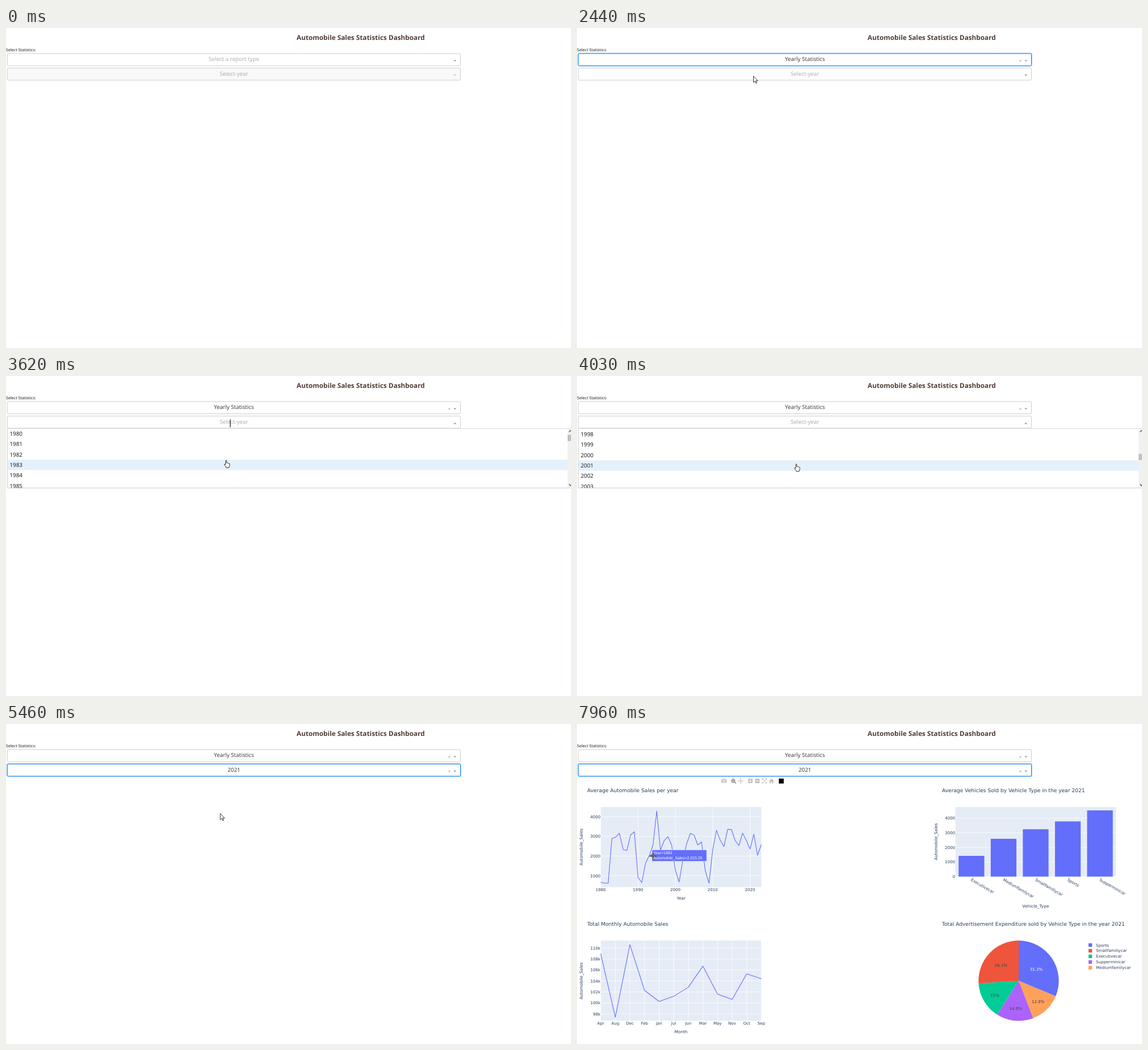
An HTML page that plays this animation: 994x563 px, repeating every 8 s.

```html
<!DOCTYPE html>
<html lang="en">
<head>
<meta charset="utf-8">
<title>Dashboard</title>
<style>
  html, body { margin: 0; width: 100%; height: 100%; overflow: hidden; background: #fff; }
  svg { display: block; width: 994px; height: 563px; }
  text { white-space: pre; text-rendering: geometricPrecision; }
  .ui { font: 9.85px "Open Sans", "Noto Sans", sans-serif; }
  .plot { font: 7.1px "DejaVu Sans", sans-serif; fill: #2a3f5f; }
  .tip { font: 6.9px "Liberation Sans", Arial, sans-serif; fill: #fff; }
</style>
</head>
<body>
<script>
const LOOP = 8000;
const BLUE = '#636efa', GRAY = '#ccc', FOCUS = '#007eff', HOVER = '#e4f1fc';

function add(parent, tag, attrs = {}, text) {
  const node = document.createElementNS('http://www.w3.org/2000/svg', tag);
  set(node, attrs);
  if (text !== undefined) node.textContent = text;
  parent.appendChild(node);
  return node;
}
function set(node, attrs) {
  for (const key in attrs) node.setAttribute(key, attrs[key]);
}
const show = (node, on) => set(node, { visibility: on ? 'visible' : 'hidden' });
const group = (parent, attrs) => add(parent, 'g', attrs);
const rect = (parent, x, y, width, height, fill, more) =>
  add(parent, 'rect', { x, y, width, height, fill, ...more });
const path = (parent, d, attrs) => add(parent, 'path', { d, ...attrs });
const label = (parent, x, y, text, more) => add(parent, 'text', { x, y, ...more }, text);
const MID = { 'text-anchor': 'middle' }, END = { 'text-anchor': 'end' };

const svg = add(document.body, 'svg', { viewBox: '0 0 994 563' });

// Header
const ui = group(svg, { class: 'ui' });
label(ui, 624, 21.3, 'Automobile Sales Statistics Dashboard',
  { ...MID, fill: '#503d36', style: 'font-size:11.77px;font-weight:700' });
label(ui, 0, 41.3, 'Select Statistics:', { fill: '#111', style: 'font-size:7.17px' });

// Select boxes
function makeSelect(y) {
  const g = group(ui);
  const glow = rect(g, 1.6, y - .4, 798.8, 22.8, 'none', { rx: 2.5, stroke: FOCUS, 'stroke-opacity': .3, 'stroke-width': 1.4 });
  const box = rect(g, 2.3, y + .4, 797.2, 21.4, '#fff', { rx: 2 });
  const text = label(g, 401, y + 13.6, '', MID);
  const clear = path(g, `M778.3 ${y + 11.5}l3.4 3.4m0 -3.4l-3.4 3.4`, { stroke: '#999', 'stroke-width': .8 });
  const arrow = path(g, '');
  const caret = rect(g, 394, y + 6.3, 1, 14, '#000');
  return state => {
    show(glow, state.focus);
    set(box, { stroke: state.focus ? FOCUS : GRAY, fill: state.disabled ? '#f9f9f9' : '#fff' });
    text.textContent = state.value || state.hint;
    set(text, { fill: state.value ? '#333' : '#aaa' });
    show(clear, !!state.value);
    set(arrow, {
      d: state.open ? `M787.2 ${y + 14.4}h5.2l-2.6 -2.6z` : `M787.2 ${y + 11.8}h5.2l-2.6 2.6z`,
      fill: state.disabled ? GRAY : '#999'
    });
    show(caret, state.caret);
  };
}
const drawReport = makeSelect(44.6);
const drawYear = makeSelect(70);

// Option menus
const ROW = 18.3, MENU_TOP = 92.4, SCROLL_MAX = 700.4;
function makeMenu(top, height, options) {
  const g = group(ui);
  const clipId = 'menu' + top;
  const clip = add(g, 'clipPath', { id: clipId });
  rect(clip, 2.5, top, 992, height);
  rect(g, 2.3, top, 1000, height, '#fff', { stroke: GRAY });
  const view = group(g, { 'clip-path': `url(#${clipId})` });
  const list = group(view);
  const mark = rect(list, 2.8, top, 992, ROW, HOVER);
  options.forEach((text, i) => label(list, 6.4, top + i * ROW + 12.7, text, { fill: '#111' }));
  path(g, `M2 ${top}H994`, { stroke: '#e2e2e2', 'stroke-width': .8 });
  return { g, list, mark };
}
const reportMenu = makeMenu(67, 2 * ROW, ['Yearly Statistics', 'Recession Period Statistics']);
const yearMenu = makeMenu(MENU_TOP, 104.6, Array.from({ length: 44 }, (_, i) => 1980 + i));
rect(yearMenu.g, 988, 93, 6, 103.5, '#f1f1f1');
const thumb = rect(yearMenu.g, 988, 103.5, 6, 11, '#c1c1c1');
path(yearMenu.g, 'M990.4 98.6l2.6 -2.8l2.6 2.8M990.4 190.2l2.6 2.8l2.6 -2.8',
  { fill: 'none', stroke: '#505050', 'stroke-width': 1.2 });

// Charts
const charts = group(svg, { class: 'plot' });
const heading = (x, y, text) => label(charts, x, y, text, { style: 'font-size:9.1px' });
const axisName = (x, y, text, turn) => label(charts, x, y, text,
  { ...MID, style: 'font-size:7.35px', ...(turn && { transform: `rotate(-90 ${x} ${y})` }) });

function panel(x, y, w, h, rows, cols) {
  rect(charts, x, y, w, h, '#e5ecf6');
  const d = rows.map(r => `M${x} ${r.at}h${w}`).join('') + cols.map(c => `M${c.at} ${y}v${h}`).join('');
  path(charts, d, { stroke: '#fff', 'stroke-width': .8 });
  rows.forEach(r => label(charts, x - .5, r.at + 2.6, r.text, END));
  cols.forEach(c => label(charts, c.at, y + h + 7.3, c.text, MID));
}
function polyline(points) {
  add(charts, 'polyline', { points: points.map(p => p.x + ',' + p.y).join(' '),
    fill: 'none', stroke: BLUE, 'stroke-width': 1.1, 'stroke-linejoin': 'round' });
}
const ticks = (from, to, step, at, text = String) => {
  const out = [];
  for (let v = from; v <= to; v += step) out.push({ at: at(v), text: text(v) });
  return out;
};

const yearX = year => 41.7 + (year - 1980) * 6.57;
const salesY = v => 267 - (v - 1000) * .03467;
const sales = [
  668, 625, 625, 2889, 2961, 3163, 2335, 2285, 3062, 3230, 913,
  654, 1635, 2023.25, 2543, 4288, 2298, 2788, 2990, 2557, 1270,
  683, 1808, 2615, 3149, 3062, 2557, 2715, 1260, 625, 2327,
  3307, 2805, 2485, 3355, 3350, 2788, 2529, 3163, 2788, 2356, 3106, 2038, 2586
].map((v, i) => ({ year: 1980 + i, value: v, x: yearX(1980 + i), y: salesY(v) }));

heading(18, 119.7, 'Average Automobile Sales per year');
panel(41.7, 146, 282.6, 141, ticks(1000, 4000, 1000, salesY), ticks(1980, 2020, 10, yearX));
polyline(sales);
axisName(183.3, 308.6, 'Year');
axisName(10.3, 216.5, 'Automobile_Sales', true);

const monthX = i => 41.7 + i * 25.69;
const monthY = k => 394 + (110 - k) * 9.67;
const months = 'Apr Aug Dec Feb Jan Jul Jun Mar May Nov Oct Sep'.split(' ');
heading(18, 355.2, 'Total Monthly Automobile Sales');
panel(41.7, 381, 282.6, 141, ticks(98, 110, 2, monthY, k => k + 'k'),
  months.map((text, i) => ({ at: monthX(i), text })));
polyline([108.96, 97.4, 110.6, 102.3, 100.25, 101.2, 102.85, 106.7, 101.6, 100.65, 105.3, 104.4]
  .map((k, i) => ({ x: monthX(i), y: monthY(k) })));
axisName(183, 544, 'Month');
axisName(10.3, 452, 'Automobile_Sales', true);

heading(642, 119.7, 'Average Vehicles Sold by Vehicle Type in the year 2021');
panel(665.7, 146, 282.6, 122.5, ticks(0, 4000, 1000, v => 268.5 - v * .0257), []);
[['Executivecar', 232], ['Mediumfamilycar', 202], ['Smallfamiliycar', 185.2], ['Sports', 171.4], ['Supperminicar', 152]]
  .forEach(([text, top], i) => {
    const x = 671.35 + i * 56.52;
    rect(charts, x, top, 45.2, 268.5 - top, BLUE);
    label(charts, x + 21, 275.6, text, { transform: `rotate(30 ${x + 21} 275.6)` });
  });
axisName(807, 322.6, 'Vehicle_Type');
axisName(634.3, 207, 'Automobile_Sales', true);

heading(642, 355.2, 'Total Advertisement Expenditure sold by Vehicle Type in the year 2021');
const slices = [
  ['Sports', 31.3, BLUE, 808, 431],
  ['Mediumfamilycar', 12.8, '#ffa15a', 811.3, 488],
  ['Supperminicar', 14.9, '#ab63fa', 771.6, 500.6],
  ['Executivecar', 15, '#00cc96', 735, 477.5],
  ['Smallfamiliycar', 26.1, '#ef553b', 746, 424]
];
const rim = share => {
  const a = share * Math.PI / 50;
  return `${777 + 70.6 * Math.sin(a)} ${451.7 - 70.6 * Math.cos(a)}`;
};
let share = 0;
slices.forEach(([, part, fill, x, y], i) => {
  path(charts, `M777 451.7L${rim(share)}A70.6 70.6 0 0 1 ${rim(share += part)}z`, { fill });
  label(charts, x, y + 2.5, part + '%', { ...MID, fill: i ? '#444' : '#fff' });
});
[0, 4, 3, 2, 1].forEach((s, i) => {
  const y = 389 + i * 9.95;
  rect(charts, 899.9, y - 3.2, 6.3, 6.3, slices[s][2]);
  label(charts, 913, y + 2.5, slices[s][0]);
});

// Chart toolbar
const bar = group(svg, { fill: '#444', stroke: '#444', 'stroke-width': 0 });
const icon = (d, opacity, more) => path(bar, d, { opacity, 'fill-rule': 'evenodd', ...more });
const stroke = width => ({ fill: 'none', 'stroke-width': width });
icon('M254 97.6h2l1 -1.2h3l1 1.2h2v6h-9zM258.5 98.6a2 2 0 1 0 .01 0zM258.5 99.6a1 1 0 1 1 -.01 0z', .32);
icon('M277.5 102.3l2.3 2.2M274.8 96.8a2.9 2.9 0 1 0 .01 0zM273.4 99.7h2.8m-1.4 -1.4v2.8', .75, stroke(1.2));
icon('M288 96v8.6M283.8 100.3h8.4M286.8 97.4l1.2 -1.3l1.2 1.3M286.8 103.2l1.2 1.3l1.2 -1.3M285.2 99l-1.3 1.3l1.3 1.3M290.8 99l1.3 1.3l-1.3 1.3', .34, stroke(.9));
icon('M301.2 96.5h7.6v7.6h-7.6zM304.4 98v1.7h-1.7v1.2h1.7v1.7h1.2v-1.7h1.7v-1.2h-1.7v-1.7z', .34);
icon('M313.5 96.5h7.6v7.6h-7.6zM315 99.7v1.2h4.6v-1.2z', .34);
icon('M326 96.6l7.4 7.4m0 -7.4l-7.4 7.4M325.8 98.8v-2.4h2.4M331.2 96.4h2.4v2.4M333.6 101.8v2.4h-2.4M328.2 104.2h-2.4v-2.4', .36, stroke(.9));
icon('M342.2 96.2l4.6 4.2h-1.2v3.8h-2.4v-2.6h-2v2.6h-2.4v-3.8h-1.2z', .34);
rect(bar, 355, 96, 8.7, 8.7, '#000');

// Hover label
const tip = group(svg, { class: 'tip' });
path(tip, 'M0 0L5 -3.5V-10H101V10H5V3.5z', { fill: BLUE, stroke: '#fff', 'stroke-width': .5 });
const tipYear = label(tip, 7, -2.1, '');
const tipSales = label(tip, 7, 6.9, '');

// Pointers
const ink = { fill: '#fff', stroke: '#000', 'stroke-width': .8, 'stroke-linejoin': 'round' };
const pointers = { arrow: group(svg), hand: group(svg), cross: group(svg) };
path(pointers.arrow, 'M.4 .5V11.4L2.9 9.1L4.6 13L6.3 12.2L4.7 8.5H8z', ink);
path(pointers.hand, 'M-.9 .9Q0 -.5 .9 .9V5Q2 4.2 2.7 5.3Q3.8 4.6 4.4 5.7Q6.2 5.3 6.3 7V9.5L5.3 11.5V13.2H-.2V12L-3 8.2Q-3.4 6.8 -2 6.9L-.9 8z', ink);
path(pointers.cross, 'M-6.5 0H6.5M0 -6.5V6.5', { stroke: '#5f5a3c', 'stroke-width': 1.6 });

// Timeline
const REPORT_OPEN = 810, REPORT_PICK = 1950, YEAR_ENABLED = 2080,
  YEAR_OPEN = 3300, YEAR_PICK = 5390, CHARTS = 6580;
const moves = [
  [130, 804, 448], [200, 720, 340], [270, 600, 190], [340, 480, 70], [410, 417, 22], [480, 424, 47],
  [1210, 424, 47], [1350, 383, 71.5], [1950, 383, 71.5], [2220, 297, 132], [2440, 310, 84.3],
  [2650, 330, 82], [2720, 330, 82], [3200, 391, 83], [3310, 391, 84], [3480, 387, 140],
  [3620, 387.3, 148], [4230, 385, 157.6], [5180, 385, 157.6], [5400, 376.6, 157],
  [6840, 376.6, 157], [7000, 308, 164], [7200, 205, 177], [7480, 55, 205], [7610, 62, 203],
  [7680, 65, 204], [7960, 133.5, 232.4]
];
const scrolls = [[3690, 0], [4230, 520], [4360, 520], [4560, SCROLL_MAX]];
const kinds = [[0, ''], [130, 'arrow'], [1280, 'hand'], [1950, 'arrow'], [3370, 'hand'],
  [4430, 'arrow'], [4640, 'hand'], [5390, 'arrow'], [6965, 'cross']];

function tween(keys, t) {
  if (t <= keys[0][0]) return keys[0].slice(1);
  const i = keys.findIndex(k => k[0] > t);
  if (i < 0) return keys[keys.length - 1].slice(1);
  const a = keys[i - 1], b = keys[i], u = (t - a[0]) / (b[0] - a[0]);
  return a.slice(1).map((v, n) => v + (b[n + 1] - v) * u);
}
const blink = (t, start) => (t - start) % 1060 < 530;
const between = (t, a, b) => t >= a && t < b;

function render(t) {
  const [x, y] = tween(moves, t);
  const reportOpen = between(t, REPORT_OPEN, REPORT_PICK);
  const yearOpen = between(t, YEAR_OPEN, YEAR_PICK);

  drawReport({
    hint: 'Select a report type', value: t >= REPORT_PICK && 'Yearly Statistics',
    focus: between(t, REPORT_PICK, YEAR_OPEN), open: reportOpen,
    caret: reportOpen && blink(t, REPORT_OPEN)
  });
  drawYear({
    hint: 'Select-year', value: t >= YEAR_PICK && '2021', disabled: t < YEAR_ENABLED,
    focus: t >= YEAR_PICK, open: yearOpen, caret: yearOpen && blink(t, YEAR_OPEN)
  });
  show(reportMenu.g, reportOpen);
  show(yearMenu.g, yearOpen);

  // The marked row trails the list until the wheel comes to rest.
  const [scroll] = tween(scrolls, t);
  const settled = t < 4640 ? Math.min(scroll, 680) : scroll;
  const row = Math.max(0, Math.floor((y - MENU_TOP + settled) / ROW));
  set(yearMenu.list, { transform: `translate(0 ${-scroll})` });
  set(yearMenu.mark, { y: MENU_TOP + row * ROW });
  set(thumb, { y: 103.5 + scroll / SCROLL_MAX * 71.5 });

  show(charts, t >= CHARTS);
  show(bar, t >= CHARTS && x < 364);

  const kind = kinds.filter(k => k[0] <= t).pop()[1];
  for (const name in pointers) {
    show(pointers[name], name === kind);
    set(pointers[name], { transform: `translate(${x} ${y})` });
  }

  const gap = p => Math.hypot(p.x - x, p.y - y);
  const near = sales.reduce((a, b) => gap(b) < gap(a) ? b : a);
  show(tip, kind === 'cross' && gap(near) < 10.5);
  set(tip, { transform: `translate(${near.x} ${near.y})` });
  tipYear.textContent = 'Year=' + near.year;
  tipSales.textContent = 'Automobile_Sales=' + near.value.toLocaleString('en-US');
}

const start = performance.now();
function tick() {
  render((performance.now() - start) % LOOP);
  requestAnimationFrame(tick);
}
tick();
</script>
</body>
</html>
```
